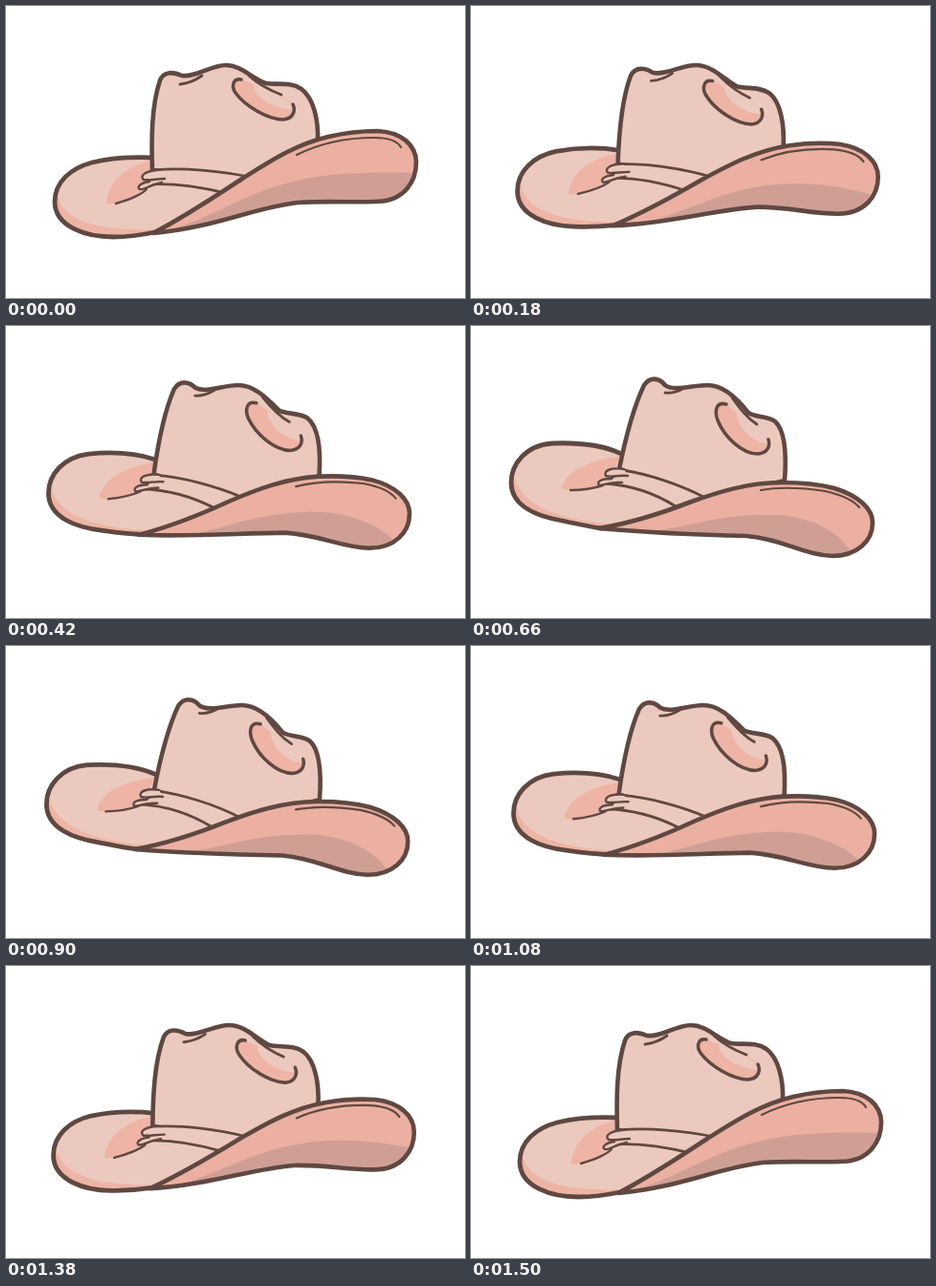
Write an HTML page with a canvas that moves like this. It is 480 px wide and 306 px high and loops after 1.53 s.

```html
<!DOCTYPE html>
<html lang="en">
<head>
<meta charset="utf-8">
<title>Rocking hat</title>
<style>
  html, body { margin: 0; width: 100%; height: 100%; overflow: hidden; background: #fff; }
  canvas { display: block; }
</style>
</head>
<body>
<canvas id="stage" width="480" height="306"></canvas>
<script>
const ctx = document.getElementById("stage").getContext("2d");
const LOOP = 1530, STEP = 30, SWING = 1500, TILT_TIME = 660;
const LINE = "#5f4841", LIGHT = "#ecc9be", PINK = "#eeb4a5", FRONT = "#ebb0a2", SHADE = "#cf9f95";

// Each part has a resting path and a tilted path with the same structure.
const parts = {
  brim: [
    "M156 159 C135 158 110 159 90 164 C68 170 51 184 51 205 C51 232 85 242 112 242 C128 242 142 240 156 237 L250 197 L200 160Z",
    "M155 133 C135 124 110 122 85 123 C57 125 42 145 42 164 C42 190 72 200 95 204 C110 207 122 210 136 212 L245 200 L200 150Z"],
  brimLight: [
    "M156 159 C135 158 110 159 90 164 C68 170 53 184 53 195 C58 225 92 237 165 234 L250 197 L200 160Z",
    "M155 133 C135 124 110 122 85 123 C57 125 44 145 44 155 C50 187 90 203 150 208 L245 180 L200 150Z"],
  brimShade: [
    "M156 162 C130 164 105 183 105 208 C122 207 142 198 150 184Z",
    "M155 137 C130 139 97 151 95 171 C112 174 130 171 146 162Z"],
  crown: [
    "M153 172 C152 140 152 105 161 78 C165 68 175 69 184 73 C198 75 214 62 230 62 C246 62 257 76 272 81 C284 83 297 79 309 87 C321 96 327 118 326 142 L250 182Z",
    "M155 150 C161 120 169 87 181 62 C187 53 197 54 203 62 C212 69 232 62 247 62 C266 62 281 79 290 91 C298 96 310 94 318 100 C329 110 330 135 328 162 L245 182Z"],
  fold: [
    "M182 82 C190 81 198 78 205 73",
    "M203 70 C210 71 216 69 223 65"],
  dentFill: [
    "M246 77 C238 75 235 84 240 91 C250 105 274 119 290 119 C301 118 303 109 300 103 C290 92 262 84 246 77Z",
    "M267 82 C257 79 254 88 258 99 C265 116 283 134 300 134 C311 133 313 125 311 119 C298 106 279 92 267 82Z"],
  dentLight: [
    "M259 82 C258 95 283 110 300 108 C300 100 285 92 259 82Z",
    "M278 87 C275 104 294 123 311 123 C309 112 296 102 278 87Z"],
  dentLine: [
    "M246 77 C238 75 235 84 240 91 C250 105 274 119 290 119 C301 118 303 109 300 103",
    "M267 82 C257 79 254 88 258 99 C265 116 283 134 300 134 C311 133 313 125 311 119"],
  ridge: [
    "M254 73 C265 83 275 88 288 93",
    "M273 75 C281 86 288 96 299 103"],
  band: [
    "M155 172 C185 169 225 173 254 179 L230 196 C205 190 178 185 148 187Z",
    "M158 151 C185 155 218 166 243 179 L214 189 C195 177 170 167 140 165Z"],
  knot: [
    "M158 172 C146 173 139 178 144 182 C150 183 158 181 166 181",
    "M160 150 C148 148 138 151 141 157 C148 159 153 156 164 157"],
  lowerKnot: [
    "M150 184 C141 185 136 190 140 192 C146 193 147 188 163 185",
    "M147 160 C136 160 131 163 134 167 C142 166 146 163 158 164"],
  tail: [
    "M147 192 C140 199 128 203 115 207",
    "M138 167 C126 171 116 172 104 172"],
  front: [
    "M154 238 C190 219 221 198 247 181 C277 162 303 145 337 137 C354 133 372 131 388 131 C414 132 429 146 429 164 C429 182 418 205 386 205 C360 206 335 204 305 206 C260 211 215 233 154 238Z",
    "M134 212 C170 206 205 194 228 185 C258 174 290 164 325 164 C345 164 365 166 380 170 C406 178 420 192 420 206 C420 226 403 241 378 241 C348 240 325 223 288 220 C240 219 190 217 134 212Z"],
  frontShade: [
    "M168 236 C215 222 250 196 300 184 C340 174 385 174 430 175 L430 215 L168 245Z",
    "M190 215 C235 209 265 196 318 198 C350 199 385 213 398 238 L398 250 L190 225Z"],
  frontLine: [
    "M304 156 C330 143 360 138 385 138 C400 138 409 141 413 148",
    "M303 172 C325 168 350 170 370 173 C388 177 399 182 406 190"]
};

const PAIR = /(\d+) (\d+)/g;

// The right side of the hat leads the swing slightly; the left side lags.
function morph([rest, tilted], swing) {
  const goals = [...tilted.matchAll(PAIR)];
  let i = 0;
  return new Path2D(rest.replace(PAIR, (_, x, y) => {
    const k = swing ** (1.36 - x / 1300);
    const [, gx, gy] = goals[i++];
    return `${(+x + (gx - x) * k).toFixed(2)} ${(+y + (gy - y) * k).toFixed(2)}`;
  }));
}

function draw(time) {
  const wave = t => Math.max(0, Math.sin(Math.PI * t / SWING));
  const swing = wave(time) / wave(TILT_TIME);
  const path = name => morph(parts[name], swing);
  const fill = (name, color) => {
    ctx.fillStyle = color;
    ctx.fill(path(name));
  };
  const line = (name, width) => {
    ctx.lineWidth = width;
    ctx.stroke(path(name));
  };
  const clipped = (name, inside) => {
    ctx.save();
    ctx.clip(path(name));
    inside();
    ctx.restore();
  };

  ctx.fillStyle = "#fff";
  ctx.fillRect(0, 0, 480, 306);
  ctx.strokeStyle = LINE;
  ctx.lineCap = ctx.lineJoin = "round";

  fill("brim", PINK);
  clipped("brim", () => fill("brimLight", LIGHT));
  fill("brimShade", PINK);
  line("brim", 4.8);

  fill("crown", LIGHT);
  fill("dentFill", PINK);
  clipped("dentFill", () => fill("dentLight", LIGHT));
  line("dentLine", 3.5);
  line("crown", 4.6);
  line("fold", 2.8);
  line("ridge", 2.8);

  fill("band", LIGHT);
  line("band", 2.8);
  fill("knot", LIGHT);
  line("knot", 2.4);
  fill("lowerKnot", LIGHT);
  line("lowerKnot", 2.4);
  line("tail", 2.4);

  fill("front", FRONT);
  clipped("front", () => fill("frontShade", SHADE));
  line("frontLine", 2.2);
  line("front", 4.6);
}

function tick() {
  const time = performance.now() % LOOP;
  draw(Math.floor(time / STEP) * STEP);
  requestAnimationFrame(tick);
}
tick();
</script>
</body>
</html>
```
